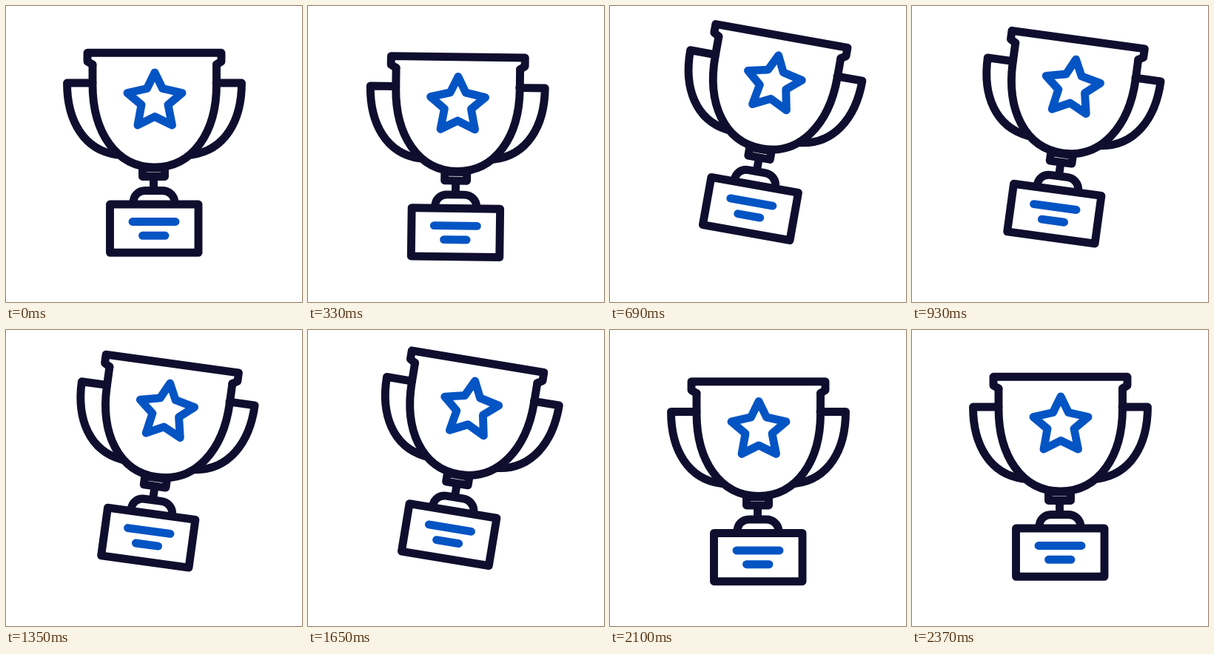
Write an HTML page that moves like this. It is 400 px wide and 400 px high and loops after 2400 ms.

```html
<!DOCTYPE html>
<html lang="en">
<head>
<meta charset="utf-8">
<title>Trophy</title>
<style>
html, body { margin: 0; width: 100%; height: 100%; overflow: hidden; background: #fff; }
svg { display: block; width: 100%; height: 100%; }
g { fill: none; stroke-width: 10.9; stroke-linecap: round; stroke-linejoin: round; }
.dark { stroke: #100e2e; }
.blue { stroke: #0454c4; }
</style>
</head>
<body>
<svg viewBox="0 0 400 400">
  <g id="cup">
    <g class="dark">
      <path d="M117 79L110 75V63.3H291V75L284.5 79"/>
      <path d="M117 79V106C117 170 148.5 218 200.7 218S284.5 170 284.5 106V79"/>
      <path d="M117 104H82.5C82.5 156 106 195 150 201"/>
      <path d="M284 104H318.5C318.5 156 295 195 251 201"/>
      <path d="M184.5 219H214.5V230.5H184.5Z"/>
      <path d="M199.5 231V248"/>
      <path d="M172 266C172 256 179 249.5 188 249.5H211C220 249.5 228 256 228 266"/>
      <path d="M140.5 268H260V333.3H140.5Z"/>
    </g>
    <g class="blue">
      <path d="M201 90L211.5 111.5L238 117.5L219 133.5L224.5 161L201 149.5L178 161L183 133.5L164 117.5L190.5 111.5Z"/>
      <path d="M171 291.5H229M184.5 310.3H215"/>
    </g>
  </g>
</svg>
<script>
const LOOP = 2400;
const PIVOT = { x: 200, y: 242 };
// time, tilt in degrees, vertical shift
const KEYS = [
  [0, 0, 0], [240, 0, 8], [720, 10.2, -26], [1140, 5.4, -13],
  [1560, 10.2, -26], [2015, 0, 8], [2295, 0, 0], [LOOP, 0, 0]
];
const cup = document.getElementById("cup");

// cubic-bezier(.42, 0, .58, 1), solved by bisection
function ease(p) {
  let lo = 0, hi = 1, s = p;
  for (let i = 0; i < 24; i++) {
    s = (lo + hi) / 2;
    const r = 1 - s;
    const x = 3 * r * r * s * 0.42 + 3 * r * s * s * 0.58 + s * s * s;
    if (x < p) lo = s; else hi = s;
  }
  return s * s * (3 - 2 * s);
}

function pose(t) {
  const i = KEYS.findIndex(key => key[0] > t);
  const a = KEYS[i - 1], b = KEYS[i];
  const e = ease((t - a[0]) / (b[0] - a[0]));
  return [a[1] + (b[1] - a[1]) * e, a[2] + (b[2] - a[2]) * e];
}

function draw(t) {
  const [tilt, dy] = pose(t);
  cup.setAttribute("transform", `translate(0 ${dy.toFixed(3)}) rotate(${tilt.toFixed(3)} ${PIVOT.x} ${PIVOT.y})`);
}

const start = performance.now();
function tick() {
  draw((performance.now() - start) % LOOP);
  requestAnimationFrame(tick);
}
draw(0);
requestAnimationFrame(tick);
</script>
</body>
</html>
```
